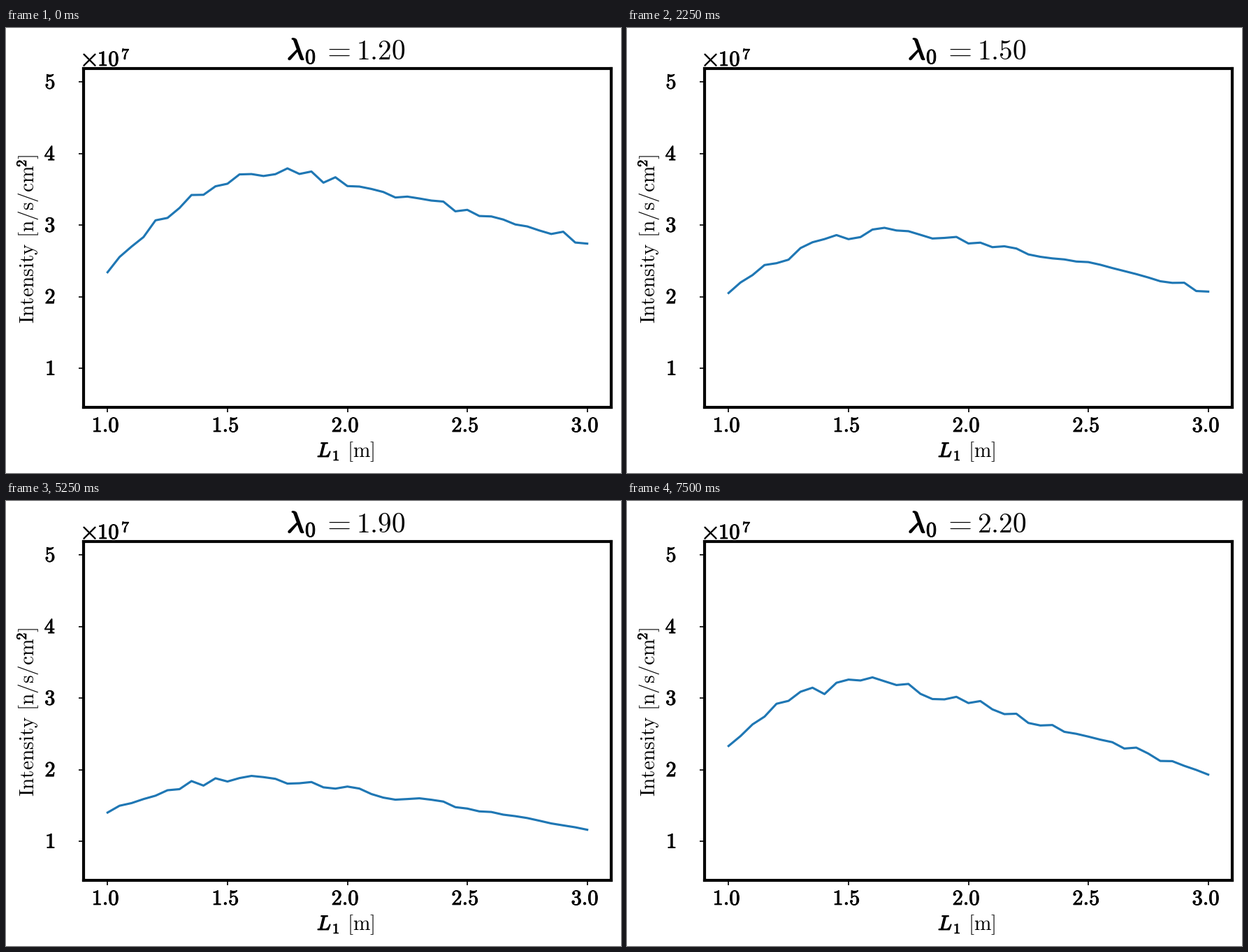
These frames come from a looping animation (880x637 px, 8000 ms). A matplotlib script:

```python
import matplotlib.pyplot as plt
import numpy as np
from matplotlib.animation import FuncAnimation
from matplotlib.patheffects import withStroke

W, H, DPI = 880, 637, 100
PX = 72 / DPI                      # points per pixel
LEFT, RIGHT, TOP, BOTTOM = 111, 866, 58, 543
BODY, TICK, TITLE = 29.4, 30.5, 39.5   # em sizes in pixels

# wavelength: intensity at the start, peak and end, in 1e7 n/s/cm^2
LEVELS = {
    1.2: (2.34, 3.74, 2.74),
    1.3: (2.18, 3.42, 2.50),
    1.4: (2.12, 3.20, 2.26),
    1.5: (2.05, 2.93, 2.07),
    1.6: (1.58, 2.24, 1.44),
    1.7: (1.62, 2.42, 1.56),
    1.8: (1.43, 2.02, 1.24),
    1.9: (1.40, 1.88, 1.16),
    2.0: (1.62, 2.25, 1.39),
    2.1: (1.97, 2.74, 1.72),
    2.2: (2.33, 3.24, 1.93),
}
lams = list(LEVELS)
length = np.linspace(1, 3, 41)

plt.rcParams["mathtext.fontset"] = "cm"
fig = plt.figure(figsize=(W / 100, H / 100), dpi=DPI, facecolor="white")


def scan(lam):
    """Eased rise to the peak, slower fall after it, with counting noise."""
    start, peak, end = LEVELS[lam]
    top = 1.73 - 0.16 * (lam - 1.2)
    rise = np.clip((length - 1) / (top - 1), 0, 1)
    fall = np.clip((length - top) / (3 - top), 0, 1)
    y = peak - (peak - start) * (1 - rise) ** 2 - (peak - end) * fall ** 1.2
    noise = np.random.default_rng(round(lam * 100)).normal(0, 0.012, y.size)
    noise[[0, -1]] = 0
    return y * (1 + noise)


def put(x, y, tex, size, style="mathrm", bold=0.0, **kw):
    """Math text with its baseline start at pixel (x, y) from the top left."""
    kw = {"ha": "left", "va": "baseline", **kw}
    label = fig.text(x / W, 1 - y / H, rf"$\{style}{{{tex}}}$",
                     fontsize=size * PX, **kw)
    if bold:
        label.set_path_effects([withStroke(linewidth=bold * PX, foreground="black")])
    return label


ax = fig.add_axes([LEFT / W, 1 - BOTTOM / H, (RIGHT - LEFT) / W, (BOTTOM - TOP) / H])
ax.set_xlim(0.9, 3.1)
ax.set_ylim(1 - 56 / 102.5, 1 + 429 / 102.5)
ax.set_xticks(np.arange(1, 3.1, 0.5))
ax.set_yticks(range(1, 6))
ax.tick_params(labelleft=False, labelbottom=False, length=7.3 * PX, width=1.67 * PX)
for spine in ax.spines.values():
    spine.set_linewidth(4.17 * PX)
line, = ax.plot(length, scan(lams[0]), color="#1f77b4", lw=3.125 * PX)

# tick labels and axis multiplier
for k in range(5):
    put(142.5 + 171.5 * k, 578, f"{1 + k / 2:.1f}", TICK, "mathbf", 0.9, ha="center")
    put(71, 496.7 - 102.5 * k, str(k + 1), TICK, "mathbf", 0.9, ha="right")
put(105.5, 55, r"\times", 36, bold=0.8)
put(131, 54, "10", TICK, "mathbf", 0.9)
put(165, 44.5, "7", 22, "mathbf", 0.8)

# axis labels
put(445, 614, "L", BODY, "mathit", 1.3)
put(467, 619, "1", 20.5, "mathbf", 0.8)
put(488, 614, "[m]", BODY)
up = dict(rotation=90, rotation_mode="anchor")
put(40, 423, "Intensity", BODY, **up)
put(40, 300, "[n/s/cm", BODY, **up)
put(29, 199, "2", 20.5, "mathbf", 0.8, **up)
put(40, 187.5, "]", BODY, **up)

# title
put(402, 45, r"\lambda", 43, "mathit", 1.8)
put(428, 51, "0", 30, "mathbf", 1)
put(452.5, 45, "=", 44)
value = put(500.5, 45, f"{lams[0]:.2f}", TITLE)


def draw(i):
    lam = lams[i // 3]
    line.set_ydata(scan(lam))
    value.set_text(rf"$\mathrm{{{lam:.2f}}}$")
    return line, value


anim = FuncAnimation(fig, draw, frames=32, interval=250, repeat=True, repeat_delay=0)
plt.show()
```
